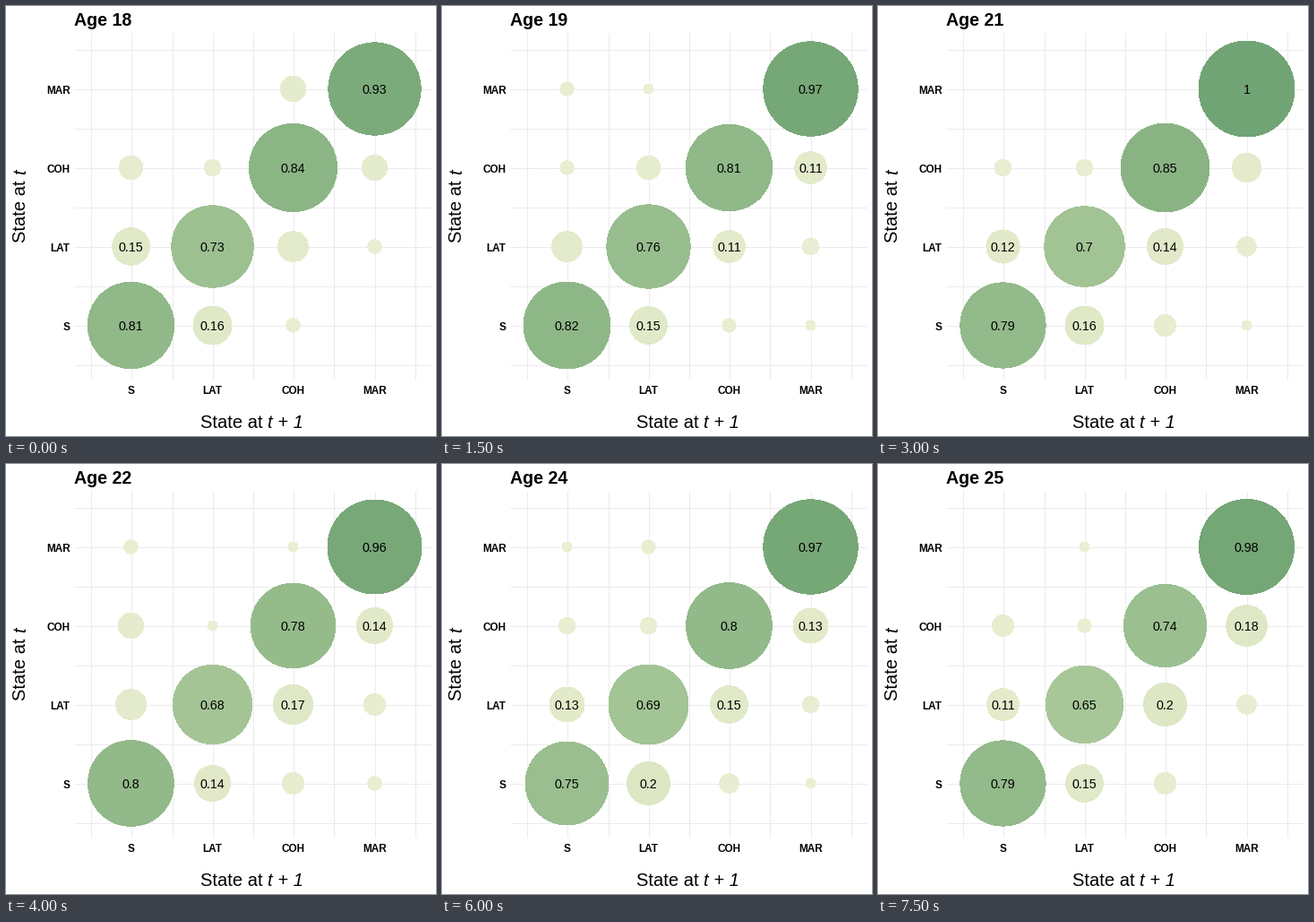
A matplotlib script that plays this animation: 480x480 px, repeating every 8000 ms.

```python
import matplotlib.pyplot as plt
import numpy as np
from matplotlib.animation import FuncAnimation
from matplotlib.patches import Circle

SIZE, DPI = 480, 100
STEPS, INTERVAL = 16, 500
PX = 72 / DPI  # points per pixel
plt.rcParams["font.family"] = "Liberation Sans"

STATES = ["S", "LAT", "COH", "MAR"]
COLS = [139.5, 230.5, 320.5, 411.5]
ROWS = [356.5, 268.5, 180.5, 92.5]

# Transition percentages per origin state; one row per time step.
FLOWS = {
    "S": [(81, 16, 2, 0), (79, 17, 3, 1), (82, 15, 2, 1),
          (79, 16, 5, 1), (80, 14, 5, 2), (77, 17, 5, 1),
          (75, 20, 4, 1), (81, 15, 3, 1), (79, 15, 5, 0)],
    "LAT": [(15, 73, 10, 2), (13, 70, 12, 5), (10, 76, 11, 3),
            (12, 70, 14, 4), (10, 68, 17, 5), (11, 68, 16, 4),
            (13, 69, 15, 3), (12, 67, 17, 4), (11, 65, 20, 4)],
    "COH": [(6, 3, 84, 7), (2, 5, 82, 10), (2, 6, 81, 11),
            (3, 3, 85, 9), (7, 1, 78, 14), (4, 2, 80, 14),
            (3, 3, 80, 13), (4, 3, 76, 17), (5, 2, 74, 18)],
    "MAR": [(0, 0, 7, 93), (6, 1, 3, 90), (2, 1, 0, 97),
            (0, 0, 0, 100), (2, 0, 1, 96), (0, 1, 0, 99),
            (1, 2, 0, 97), (1, 1, 0, 97), (0, 1, 0, 98)],
}
MAX_R = 53.5
STOPS = [0, 0.2, 0.7, 1]
SHADES = np.array([(234, 239, 211), (221, 231, 196),
                   (162, 195, 148), (113, 164, 116)]) / 255


def shade(v):
    return tuple(np.interp(v, STOPS, SHADES[:, k]) for k in range(3))


fig = plt.figure(figsize=(SIZE / DPI, SIZE / DPI), dpi=DPI, facecolor="white")
ax = fig.add_axes([0, 0, 1, 1])
ax.set_xlim(0, SIZE)
ax.set_ylim(SIZE, 0)
ax.axis("off")


def label(x, y, s, px, **kw):
    return ax.text(x, y, s, fontsize=px * PX, va=kw.pop("va", "baseline"),
                   color="black", zorder=5, **kw)


grid = dict(color="#ebebeb", linewidth=PX, zorder=0)
ax.vlines(COLS + [94.5, 185.5, 275.5, 365.5, 456.5], 30, 417, **grid)
ax.hlines(ROWS + [48.5, 136.5, 224.5, 312.5, 400.5], 76, 474, **grid)

for name, x, y in zip(STATES, COLS, ROWS):
    label(x, 433, name, 11.8, ha="center", weight="bold")
    label(71.5, y + 5, name, 11.8, ha="right", weight="bold")

label(217, 471, "State at", 20.2)
label(292, 471, "t + 1", 20.2, style="italic")
label(22, 264.5, "State at", 20.2, rotation=90, va="bottom",
      rotation_mode="anchor").set_va("baseline")
label(22, 188.5, "t", 20.2, rotation=90, rotation_mode="anchor",
      style="italic")
title = label(76, 22, "", 19.6, weight="bold")

bubbles = {}
for name, y in zip(STATES, ROWS):
    for j, x in enumerate(COLS):
        # The disc sits slightly up-left of its rim, leaving a thin sliver.
        disc = Circle((x - 0.6, y - 0.6), 1, linewidth=0,
                      antialiased=False, zorder=2)
        rim = Circle((x, y), 1, fill=False, linewidth=PX,
                     antialiased=False, zorder=2)
        ax.add_patch(disc)
        ax.add_patch(rim)
        text = label(x, y + 5, "", 14.2, ha="center")
        bubbles[name, j] = disc, rim, text


def draw(i):
    title.set_text(f"Age {18 + i // 2}")
    step = (i + 1) // 2  # bubbles switch half a year ahead of the title
    for (name, j), (disc, rim, text) in bubbles.items():
        v = FLOWS[name][step][j] / 100
        r = MAX_R * np.sqrt(v)
        disc.set_visible(v > 0)
        rim.set_visible(v > 0)
        disc.set_radius(max(r - 0.9, 0))
        rim.set_radius(max(r - 0.5, 0))
        disc.set_facecolor(shade(v))
        rim.set_edgecolor(shade(v))
        text.set_text(f"{v:g}" if v > 0.1 else "")
    return [title]


anim = FuncAnimation(fig, draw, frames=STEPS, interval=INTERVAL,
                     repeat=True, repeat_delay=0, blit=False)
plt.show()
```
